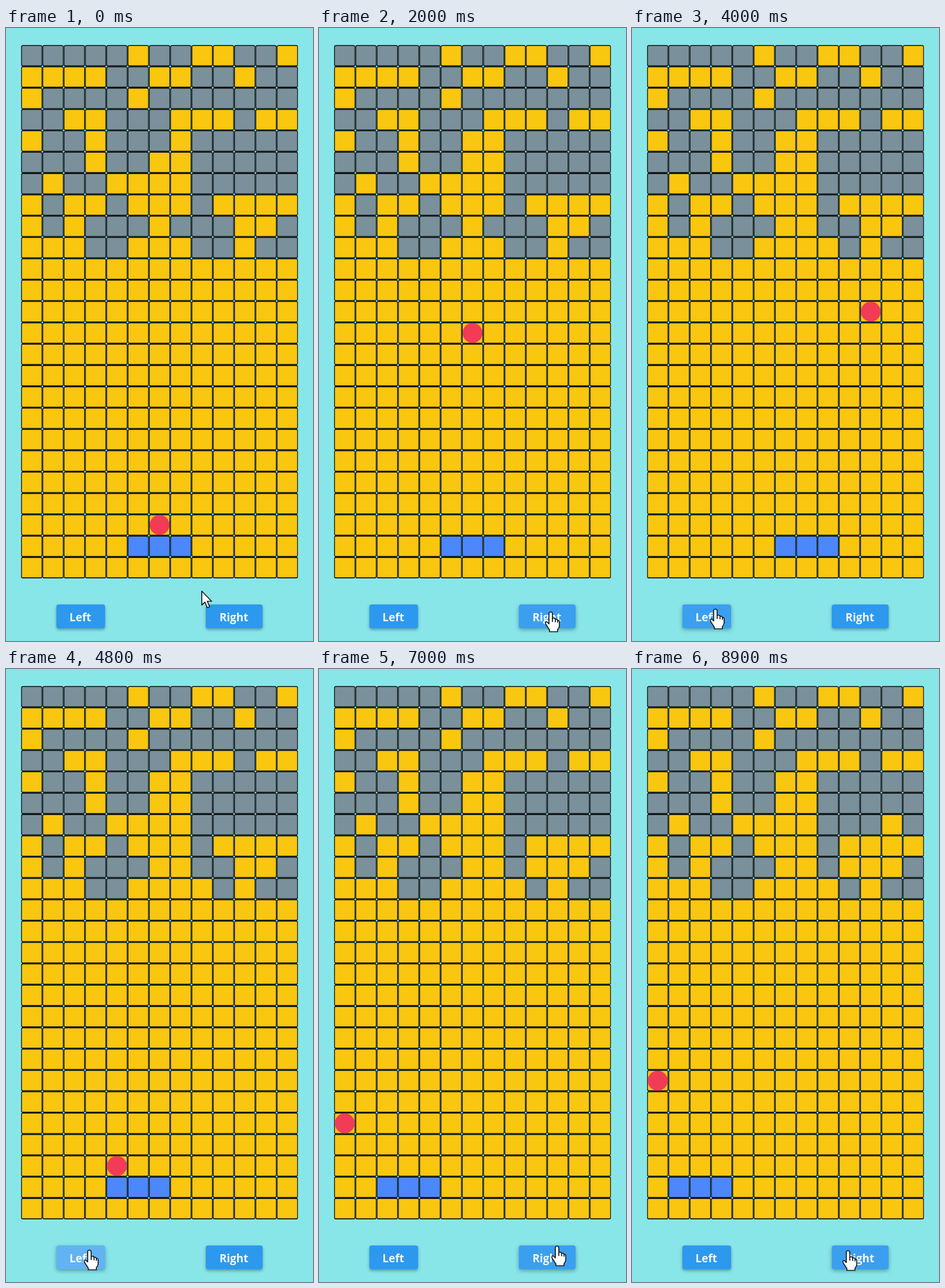
Animation, 530 px wide and 1057 px high, one loop 9000 ms. Source, as an HTML page with a canvas:

```html
<!DOCTYPE html>
<html lang="en">
<head>
<meta charset="utf-8">
<title>Brick breaker</title>
<style>
  html, body { margin: 0; width: 530px; height: 1057px; overflow: hidden; background: #88e6e8; }
  canvas { display: block; }
</style>
</head>
<body>
<canvas id="stage" width="530" height="1057"></canvas>
<script>
const ctx = document.getElementById('stage').getContext('2d');
const LOOP = 9000, FRAME = 100, STEP = 79.5, LEAD = 14;
const COLS = 13, ROWS = 25, PITCH = 36.78, LEFT = 26, TOP = 29.4;
const COLOR = { bg: '#88e6e8', empty: '#f9c610', brick: '#7a909b', paddle: '#4c87fb', ball: '#f23c55' };

const BRICKS = [
  '#####.##..##.', '....##..##.##', '.####.#######', '##..###...#..', '.##.###.#####',
  '###.##..#####', '#.##....#####', '.#..#...#....', '.#.###.###..#', '...##...##.##'
];

// [time, leftmost paddle column]
const PADDLE = [[0, 5], [2300, 6], [4200, 5], [4600, 4], [4900, 3], [5100, 2], [8200, 1]];

// [time, x, y] of the pointer tip
const POINTER = [
  [0, 338, 971], [700, 392, 1000], [1400, 400, 1007], [2400, 400, 1007], [3200, 169, 995],
  [3700, 144, 1002], [5200, 144, 1002], [5700, 369, 975], [6200, 408, 1000], [7000, 411, 995],
  [7300, 411, 995], [7900, 146, 1002], [8300, 146, 1002], [8750, 373, 1003], [9000, 373, 1003]
];

const BUTTONS = [
  { label: 'Left', x: 87, w: 84, dir: -1 },
  { label: 'Right', x: 345, w: 98, dir: 1 }
];
const BUTTON_Y = 994, BUTTON_H = 41;

const paddleAt = t => PADDLE.findLast(([at]) => at <= Math.max(t, 0))[1];

function pointerAt(t) {
  t = Math.max(t, 0);
  const i = POINTER.findIndex(([at]) => at > t);
  const [t0, x0, y0] = POINTER[i - 1], [t1, x1, y1] = POINTER[i];
  const u = (t - t0) / (t1 - t0), e = u * u * (3 - 2 * u);
  return { x: x0 + (x1 - x0) * e, y: y0 + (y1 - y0) * e };
}

const inside = (p, b) => p.x >= b.x && p.x <= b.x + b.w && p.y >= BUTTON_Y && p.y <= BUTTON_Y + BUTTON_H;

// Plays the game from the start up to time t.
function play(t) {
  const grid = BRICKS.map(row => [...row].map(c => c === '#'));
  const isBrick = (c, r) => Boolean(grid[r]?.[c]);
  const clear = (c, r) => { if (isBrick(c, r)) grid[r][c] = false; };
  let x = 6, y = 22, dx = 0, dy = -1;
  const steps = Math.floor((t + LEAD) / STEP);
  for (let k = 1; k <= steps; k++) {
    x += dx;
    y += dy;
    if (dy < 0 && isBrick(x, y - 1)) {
      clear(x, y - 1);
      clear(x + dx, y);
      dy = 1;
    }
    const offset = x - paddleAt(k * STEP - LEAD) - 1;
    if (dy > 0 && y === 22 && Math.abs(offset) <= 1) {
      dy = -1;
      dx = offset;
    }
    if (x === 0 && dx < 0 || x === COLS - 1 && dx > 0) dx = -dx;
  }
  return { x, y, isBrick };
}

function roundRect(x, y, w, h, r, fill) {
  ctx.fillStyle = fill;
  ctx.beginPath();
  ctx.roundRect(x, y, w, h, r);
  ctx.fill();
}

function drawCell(c, r, fill) {
  const x = LEFT + c * PITCH, y = TOP + r * PITCH;
  roundRect(x + .1, y, PITCH - .3, PITCH, 3, '#0b0d0c');
  roundRect(x + 1.4, y + 1.6, PITCH - 2.8, PITCH - 3.2, 1.5, fill);
}

function drawBoard(t) {
  const game = play(t), paddle = paddleAt(t);
  for (let r = 0; r < ROWS; r++) {
    for (let c = 0; c < COLS; c++) {
      const onPaddle = r === 23 && c >= paddle && c < paddle + 3;
      drawCell(c, r, onPaddle ? COLOR.paddle : game.isBrick(c, r) ? COLOR.brick : COLOR.empty);
    }
  }
  ctx.fillStyle = COLOR.ball;
  ctx.beginPath();
  ctx.arc(LEFT + (game.x + .5) * PITCH, TOP + (game.y + .5) * PITCH, 17.2, 0, Math.PI * 2);
  ctx.fill();
}

function isPressed(button, t) {
  return PADDLE.some(([at, col], i) =>
    i && Math.sign(col - PADDLE[i - 1][1]) === button.dir && t >= at && t - at <= 250);
}

function drawButton(button, t) {
  const hovered = inside(pointerAt(t - FRAME), button);
  const fill = isPressed(button, t) ? '#62b3f3' : hovered ? '#3b9fef' : '#2c99ee';
  ctx.save();
  ctx.shadowColor = 'rgba(0, 40, 60, .4)';
  ctx.shadowBlur = hovered ? 7 : 5;
  ctx.shadowOffsetY = 2.5;
  roundRect(button.x, BUTTON_Y, button.w, BUTTON_H, 4, fill);
  ctx.restore();
  ctx.fillStyle = '#f2f8fd';
  ctx.font = '700 19px "Open Sans", sans-serif';
  ctx.textAlign = 'center';
  ctx.textBaseline = 'alphabetic';
  ctx.fillText(button.label, button.x + button.w / 2 - .7, 1022.5);
}

const ARROW = new Path2D('M0 0V24L5.5 19L9.5 28.5L13.5 27L9.5 17.5H17Z');
const HAND = new Path2D('M-3 3Q-3 0 0 0Q3 0 3 3V11Q7 9.5 8 12.5Q11 11.5 12 14.5Q15 14 15 17V24Q15 27 12 30V34H-2V31L-8.5 21Q-10 17 -6.5 17L-3 20.5Z');
const KNUCKLES = new Path2D('M3 11V17M8 12.5V17.5M12 14.5V18.5');

function drawPointer(t) {
  const p = pointerAt(t), hand = BUTTONS.some(b => inside(p, b));
  ctx.save();
  ctx.translate(p.x, p.y);
  ctx.fillStyle = '#fff';
  ctx.strokeStyle = '#15191c';
  ctx.lineWidth = 1.7;
  ctx.lineJoin = 'round';
  const shape = hand ? HAND : ARROW;
  ctx.fill(shape);
  ctx.stroke(shape);
  if (hand) ctx.stroke(KNUCKLES);
  ctx.restore();
}

function draw(now) {
  const t = Math.floor(now % LOOP / FRAME) * FRAME;
  ctx.fillStyle = COLOR.bg;
  ctx.fillRect(0, 0, 530, 1057);
  drawBoard(t);
  BUTTONS.forEach(b => drawButton(b, t));
  drawPointer(t);
}

let start;
function tick(now) {
  start ??= now;
  draw(now - start);
  requestAnimationFrame(tick);
}
draw(0);
requestAnimationFrame(tick);
</script>
</body>
</html>
```
